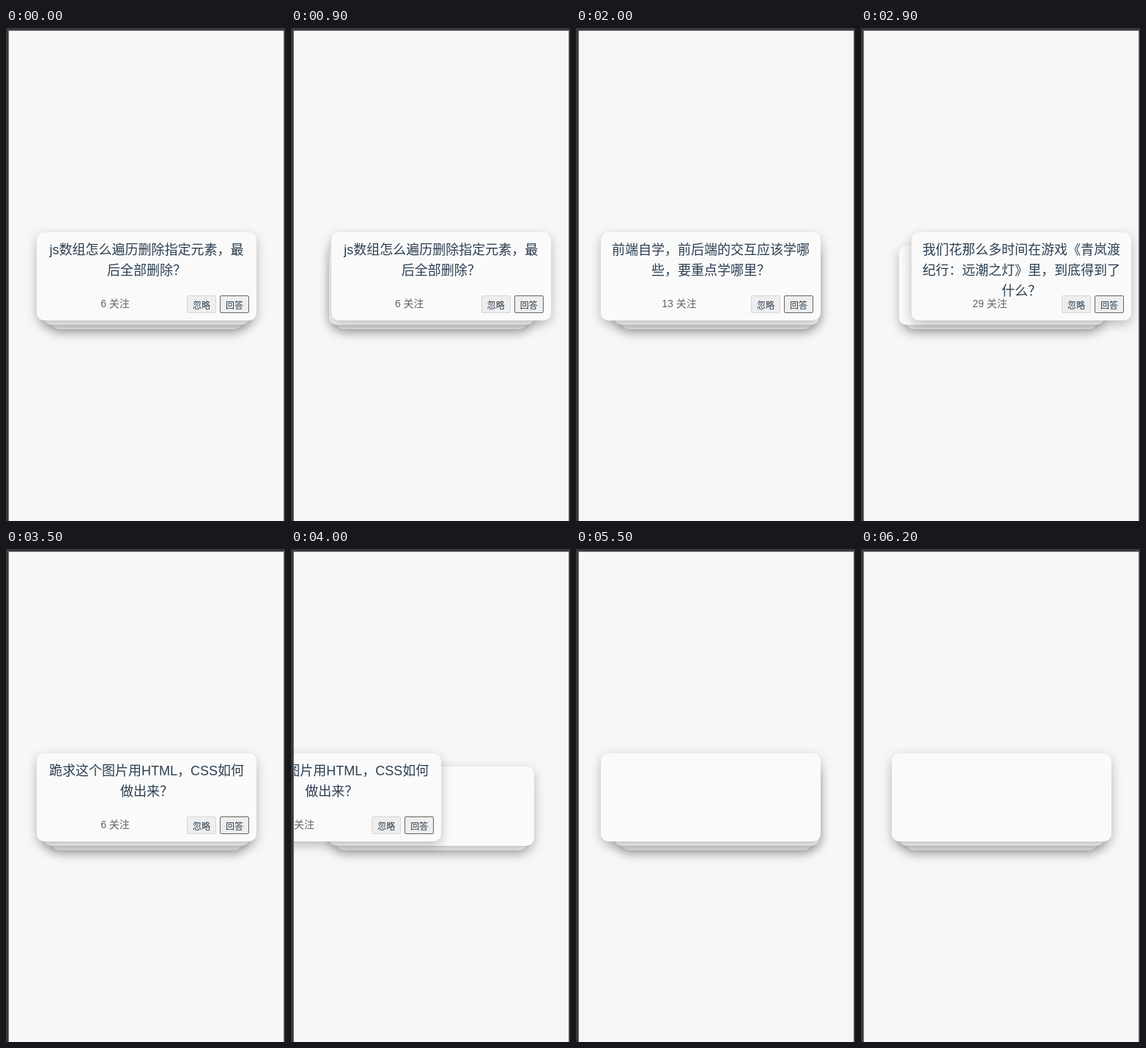
Animation, 381 px wide and 671 px high, one loop 6.6 s. Source, as an HTML page:

```html
<!DOCTYPE html>
<html lang="zh-CN">
<head>
<meta charset="utf-8">
<title>问答卡片</title>
<style>
  html, body { margin: 0; width: 100%; height: 100%; overflow: hidden; background: #3b373b; }
  body { position: relative; font-family: "Liberation Sans", "Noto Sans CJK SC", "Noto Sans CJK", sans-serif; text-spacing-trim: space-all; }
  #app { position: absolute; left: 4px; top: 4px; width: 375px; height: 667px; overflow: hidden; background: #f7f7f7; box-shadow: 0 0 0 1px #777478; }
  .card { position: absolute; border-radius: 10px; background: #fafafa; box-shadow: 0 5px 15px rgba(0, 0, 0, .25); color: #2c3e50; }
  .title { padding: 10px 15px 0; font-size: 18px; line-height: 28px; text-align: center; }
  .count { position: absolute; left: 0; bottom: 11px; width: calc(100% - 86px); font-size: 14px; line-height: 24px; text-align: center; color: #666; }
  .btn { position: absolute; bottom: 10px; box-sizing: border-box; width: 40px; height: 24px; border: 1px solid #d6d6d6; border-radius: 2px; background: #eee; font-size: 12px; line-height: 26px; text-align: center; }
  .skip { right: 55px; }
  .answer { right: 10px; border-color: #666; }
</style>
</head>
<body>
<div id="app"></div>
<script>
const LOOP = 6600, STEP = 100, SETTLE = 450, FAR = 500, CARD_COUNT = 9;

const questions = [
  ['js数组怎么遍历删除指定元素，最后全部删除？', 6],
  ['前端自学，前后端的交互应该学哪些，要重点学哪里？', 13],
  ['我们花那么多时间在游戏《青岚渡纪行：远潮之灯》里，到底得到了什么？', 29],
  ['跪求这个图片用HTML，CSS如何做出来？', 6]
];

// Each swipe: drag start, release time, drag distance at release
const swipes = [
  [870, 1330, 196],
  [1990, 2140, -120],
  [2870, 3040, 153],
  [3690, 4030, -150],
  [4785, 4940, 124],
  [5485, 5740, -140]
];

const app = document.getElementById('app');

function add(parent, className, text = '') {
  const el = document.createElement('div');
  el.className = className;
  el.textContent = text;
  return parent.appendChild(el);
}

const cards = Array.from({ length: CARD_COUNT }, (_, i) => {
  const card = add(app, 'card');
  card.style.zIndex = CARD_COUNT - i;
  if (questions[i]) {
    const [title, followers] = questions[i];
    add(card, 'title', title);
    add(card, 'count', followers + ' 关注');
    add(card, 'btn skip', '忽略');
    add(card, 'btn answer', '回答');
  }
  return card;
});

const clamp = v => Math.min(1, Math.max(0, v));

// The CSS "ease" curve, cubic-bezier(.25, .1, .25, 1)
function ease(x) {
  if (x <= 0 || x >= 1) return clamp(x);
  const bezier = (s, a, b) => 3 * (1 - s) ** 2 * s * a + 3 * (1 - s) * s * s * b + s ** 3;
  let lo = 0, hi = 1;
  for (let i = 0; i < 24; i++) {
    const mid = (lo + hi) / 2;
    if (bezier(mid, .25, .25) < x) lo = mid; else hi = mid;
  }
  return bezier(lo, .1, 1);
}

function draw(time) {
  const progress = swipes.map(([, release]) => ease((time - release) / SETTLE));
  const advanced = progress.reduce((sum, p) => sum + p, 0);

  cards.forEach((card, i) => {
    const depth = i - advanced;
    const slot = Math.min(2, Math.max(0, depth));
    let shift = 0;
    if (swipes[i]) {
      const [start, release, distance] = swipes[i];
      const dragged = distance * clamp((time - start) / (release - start));
      shift = dragged + (Math.sign(distance) * FAR - dragged) * progress[i];
    }
    const visible = depth < 3 && !(progress[i] === 1);
    Object.assign(card.style, {
      display: visible ? 'block' : 'none',
      left: 38 + 10 * slot + shift + 'px',
      top: 274 + 18 * slot + 'px',
      width: 300 - 20 * slot + 'px',
      height: 120 - 12 * slot + 'px'
    });
  });
}

const began = performance.now();
function tick() {
  const time = (performance.now() - began) % LOOP;
  draw(Math.floor(time / STEP) * STEP);
  requestAnimationFrame(tick);
}
tick();
</script>
</body>
</html>
```
